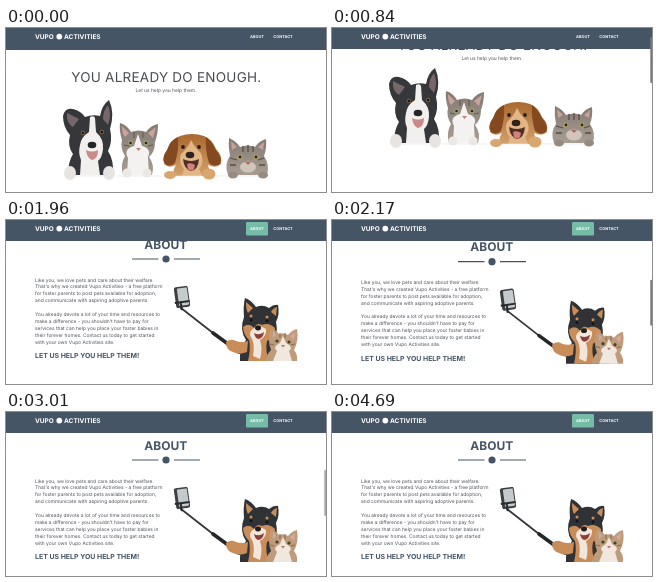
Write an HTML page that moves like this. It is 320x164 px and loops after 4970 ms.

```html
<!DOCTYPE html>
<html lang="en">
<head>
<meta charset="utf-8">
<title>Vupo Activities</title>
<style>
  html, body { margin: 0; height: 100%; overflow: hidden; background: #fff; }
  svg { display: block; width: 100vw; height: 100vh; font-family: Inter, "Open Sans", sans-serif; text-rendering: geometricPrecision; }
  .mid { text-anchor: middle; }
  .bold { font-weight: 700; }
  .copy { font-size: 4.9px; fill: #4d5358; }
  .slate { fill: #455565; }
</style>
</head>
<body>
<svg viewBox="0 0 320 164">
  <defs>
    <linearGradient id="gold" x1="0" y1="0" x2="0" y2="1">
      <stop offset="0" stop-color="#a9682f"/><stop offset="1" stop-color="#d3a06b"/>
    </linearGradient>
    <linearGradient id="tabby" x1="0" y1="0" x2="0" y2="1">
      <stop offset="0" stop-color="#837a72"/><stop offset="1" stop-color="#a79d93"/>
    </linearGradient>
  </defs>

  <g id="page">
    <g id="hero">
      <rect class="slate" y="21" width="320" height="1"/>
      <text class="mid" x="160.3" y="54" font-size="13.5" letter-spacing=".25" fill="#484b4e">YOU ALREADY DO ENOUGH.</text>
      <text class="mid copy" x="160" y="63.7">Let us help you help them.</text>

      <!-- black and white dog -->
      <path fill="#35373a" d="M62 147Q62 134 67 126Q61 118 64 107Q57 99 57 88Q59 79 67 81Q75 83 79 89Q87 86 94 88Q96 77 103 72Q109 85 104 101Q107 113 102 123Q108 132 107 147Z"/>
      <path fill="#77676a" d="M61 85Q60 95 67 99L73 91ZM102 77Q97 83 97 91L102 97Q106 86 102 77Z"/>
      <path fill="#f2f0ef" d="M84 89Q88 87 89 90L90 104Q98 111 97 121Q96 130 92 133L94 147H74L75 132Q72 125 74 117Q75 109 83 104Z"/>
      <path fill="#c98a88" d="M80 122Q86 125 92 122Q92 131 86 132Q81 130 80 122Z"/>
      <ellipse cx="86" cy="117" rx="4.3" ry="3.3" fill="#252528"/>
      <g fill="#8b603c"><circle cx="77" cy="105" r="2.2"/><circle cx="96" cy="104" r="2.2"/></g>
      <g fill="#151618"><circle cx="77" cy="105" r="1.3"/><circle cx="96" cy="104" r="1.3"/></g>
      <g fill="#e8e4e1"><ellipse cx="64" cy="145" rx="6" ry="7"/><ellipse cx="103" cy="145" rx="6" ry="7"/></g>

      <!-- tabby and white cat -->
      <path fill="url(#tabby)" d="M117 147Q114 136 119 128Q114 120 116 112Q113 103 114 95Q121 97 125 104Q133 101 140 104Q145 97 152 96Q152 106 149 114Q149 124 143 129Q149 137 146 147Z"/>
      <path fill="#c9a49c" d="M116 98Q116 106 119 109L123 105ZM150 99L142 105L147 110Z"/>
      <path fill="#f4f2f0" d="M132 106L136 118Q146 121 142 129L143 147H121L122 130Q117 121 128 118Z"/>
      <path fill="none" stroke="#5e564f" d="M128 104V110M137 104V110M118 117L123 118M147 117L142 118"/>
      <g fill="#a5a467"><circle cx="124.5" cy="115" r="2.4"/><circle cx="140" cy="115" r="2.4"/></g>
      <g fill="#25231f"><circle cx="124.5" cy="115" r="1.3"/><circle cx="140" cy="115" r="1.3"/></g>
      <path fill="#bd817b" d="M130 120H135L132.5 123Z"/>
      <g fill="#ece9e5"><ellipse cx="121" cy="145" rx="4.5" ry="4.5"/><ellipse cx="141" cy="145" rx="4.5" ry="4.5"/></g>

      <!-- golden dog -->
      <path fill="url(#gold)" d="M167 148Q167 141 170 137Q163 141 158 136Q156 128 162 121Q166 111 174 108Q186 104 198 108Q206 111 210 121Q217 128 215 136Q210 141 202 137L205 148Z"/>
      <path fill="#84491f" d="M172 109Q164 112 161 122Q155 130 159 136Q164 140 169 135Q173 122 172 109ZM200 109Q206 113 210 122Q217 130 214 136Q208 140 203 135Q199 122 200 109Z"/>
      <path fill="#e3b785" d="M185 112Q189 120 195 125Q199 135 193 141L196 148H176L178 141Q172 135 175 126Q182 120 185 112Z"/>
      <path fill="#502f28" d="M177 131Q185 135 193 131Q192 142 185 143Q178 141 177 131Z"/>
      <path fill="#d77f7d" d="M181 136Q185 134 189 137L188 141Q185 144 182 141Z"/>
      <ellipse cx="184" cy="127" rx="4.3" ry="3.3" fill="#30221f"/>
      <g fill="#2c1c15"><circle cx="177" cy="119" r="1.9"/><circle cx="193" cy="119" r="1.9"/></g>
      <g fill="#d9a66e"><ellipse cx="164" cy="147" rx="6" ry="4"/><ellipse cx="203" cy="146" rx="6.500" ry="5.500"/></g>

      <!-- tabby cat -->
      <path fill="url(#tabby)" d="M222 147Q218 136 224 128Q222 119 223 110Q230 113 234 119Q242 116 249 119Q253 113 260 111Q261 120 258 128Q264 137 261 147Z"/>
      <path fill="none" stroke="#574e47" stroke-width="1.3" d="M237 118V124M242 117V124M247 118V124M224 130L231 132M258 130L252 132M224 137L230 137M259 137L253 137"/>
      <path fill="#c8a198" d="M225 113L226 122L231 119ZM258 114L257 122L252 119Z"/>
      <ellipse cx="242" cy="139" rx="8" ry="5.5" fill="#d0c5ba"/>
      <g fill="#b7aa5e"><circle cx="234" cy="129" r="2.4"/><circle cx="250" cy="129" r="2.4"/></g>
      <g fill="#24221e"><circle cx="234" cy="129" r="1.4"/><circle cx="250" cy="129" r="1.4"/></g>
      <path fill="#a96a60" d="M239 134H245L242 137Z"/>
      <g fill="#968b80"><ellipse cx="227" cy="147" rx="5" ry="3.5"/><ellipse cx="257" cy="147" rx="5" ry="3.5"/></g>
      <path stroke="#e4e4e4" stroke-width=".7" d="M70 148H97M110 148H155M170 148H196M210 148H222M232 148H252"/>
    </g>

    <g id="about" transform="translate(0 207)">
      <text class="mid bold slate" x="159.8" y="37.5" font-size="12">ABOUT</text>
      <path stroke="#455565" stroke-width="1.2" d="M126 48H152.5M168 48H194"/>
      <circle class="slate" cx="160" cy="48" r="3.6"/>
      <g id="copy" class="copy"></g>
      <text class="bold slate" x="29" y="147.3" font-size="6.95">LET US HELP YOU HELP THEM!</text>

      <!-- dog with a selfie stick -->
      <g transform="translate(18 0)">
        <path fill="#303236" d="M216 150Q215 138 222 129Q215 119 220 106Q219 95 221 87Q227 89 232 96Q239 93 245 97Q250 93 254 94Q256 103 252 111Q254 121 251 127Q261 136 260 150Z"/>
        <path fill="#c98d59" d="M222 91Q222 99 224 102L229 97ZM253 96Q249 97 247 101L252 105ZM219 116Q225 111 230 117Q233 111 238 114Q245 111 251 117Q252 126 243 130Q241 139 245 150H224Q227 137 225 129Q219 123 219 116Z"/>
        <path fill="#f1e6d9" d="M230 117Q235 113 242 118Q243 125 236 129Q239 138 236 148L229 145Q231 134 228 128Q223 122 230 117Z"/>
        <path fill="#8c403c" d="M230 122Q235 125 240 121Q239 128 234 128Q231 127 230 122Z"/>
        <ellipse cx="234" cy="117" rx="3" ry="2.4" fill="#1d1d20"/>
        <g fill="#c98d59"><circle cx="227" cy="105" r="1.5"/><circle cx="243" cy="106" r="1.5"/></g>
        <g fill="#121315"><circle cx="227" cy="109" r="1.4"/><circle cx="243" cy="110" r="1.4"/></g>
      </g>
      <path fill="none" stroke="#35383b" stroke-width="1.8" stroke-linecap="round" d="M175 97L207 122"/>
      <path fill="none" stroke="#242629" stroke-width="3.6" stroke-linecap="round" d="M207 122L233 141"/>
      <g transform="rotate(-8 176 86)">
        <rect x="169" y="75.5" width="14" height="21" rx="2" fill="#3c4043"/>
        <rect x="172" y="77" width="10" height="17.5" rx="1" fill="#c5cacc"/>
        <path stroke="#282b2d" stroke-width="2" d="M168 91H183M174 91V99"/>
      </g>
      <path fill="#c88d59" d="M220 131Q225 127 230 130Q236 132 242 130L241 141Q233 144 227 141Q220 139 220 131Z"/>

      <!-- ginger cat -->
      <path fill="#bd9b7b" d="M260 150Q260 144 265 139Q261 130 265 117Q270 119 273 123Q278 121 282 124Q286 119 291 118Q293 130 288 139Q292 144 291 150Z"/>
      <path fill="#d7aaa0" d="M267 120L267 127L270 124ZM289 121L284 125L288 129Z"/>
      <path fill="#f0e8df" d="M277 125L280 132Q288 136 283 140L286 150H267L271 140Q266 136 274 132Z"/>
      <path fill="none" stroke="#806249" stroke-width=".9" d="M274 122V127M279 122V127M264 133L268 134M289 133L285 134"/>
      <g fill="#45412a"><circle cx="271" cy="130" r="1.6"/><circle cx="283" cy="131" r="1.6"/></g>
      <path fill="#b7716a" d="M275 134H279L277 136.5Z"/>
    </g>
  </g>

  <rect class="slate" width="320" height="21"/>
  <g fill="#fff" class="bold">
    <text x="29" y="11" font-size="6.5">VUPO</text>
    <circle cx="53.3" cy="8.6" r="2.9"/>
    <text x="58" y="11" font-size="6.5">ACTIVITIES</text>
    <rect id="active" x="240" y="2" width="22" height="13.5" rx="1.2" fill="#76bda7"/>
    <g class="mid" font-size="3.9">
      <text x="251" y="10.3">ABOUT</text>
      <text x="277" y="10.3">CONTACT</text>
    </g>
  </g>
  <rect id="thumb" x="318.3" width="1.7" height="46" rx=".8" fill="#77797b"/>
  <rect id="status" y="163" width="46" height="1" fill="#55585a"/>
</svg>
<script>
const LOOP = 4970, TICK = 70, ABOUT = 207, OVER = 9;
const $ = id => document.getElementById(id);
const page = $("page"), thumb = $("thumb"), hint = $("status"), active = $("active");

const copy = [
  [70.5, "Like you, we love pets and care about their welfare.",
    "That's why we created Vupo Activities - a free platform",
    "for foster parents to post pets available for adoption,",
    "and communicate with aspiring adoptive parents."],
  [104.8, "You already devote a lot of your time and resources to",
    "make a difference - you shouldn't have to pay for",
    "services that can help you place your foster babies in",
    "their forever homes. Contact us today to get started",
    "with your own Vupo Activities site."]
];
for (const [top, ...lines] of copy) lines.forEach((line, i) => {
  const text = document.createElementNS("http://www.w3.org/2000/svg", "text");
  text.setAttribute("x", 29);
  text.setAttribute("y", top + i * 6.95);
  text.textContent = line;
  $("copy").append(text);
});

const part = (t, from, to) => Math.min(1, Math.max(0, (t - from) / (to - from)));
const smooth = p => p * p * (3 - 2 * p);
const cubic = p => p < .5 ? 4 * p ** 3 : 1 - 4 * (1 - p) ** 3;

// Visible from start, then fading over the last steps
const shown = (t, start, fade, end) => t < start ? 0 : 1 - part(t, fade, end);

function draw(t) {
  const jump = cubic(part(t, 770, 980));
  const back = smooth(part(t, 2030, 2420));
  const y = (ABOUT + OVER) * jump - OVER * back;
  page.setAttribute("transform", `translate(0 ${-y})`);
  thumb.setAttribute("y", 58 + (y - ABOUT) * .28);
  thumb.setAttribute("opacity", t < 2100 ? shown(t, 840, 1400, 1540) : shown(t, 2100, 2940, 3150));
  hint.setAttribute("opacity", shown(t, 980, 1750, 1960));
  active.setAttribute("opacity", t < 910 ? 0 : 1);
}

function loop() {
  const t = performance.now() % LOOP;
  draw(Math.floor(t / TICK) * TICK);
  requestAnimationFrame(loop);
}
loop();
</script>
</body>
</html>
```
